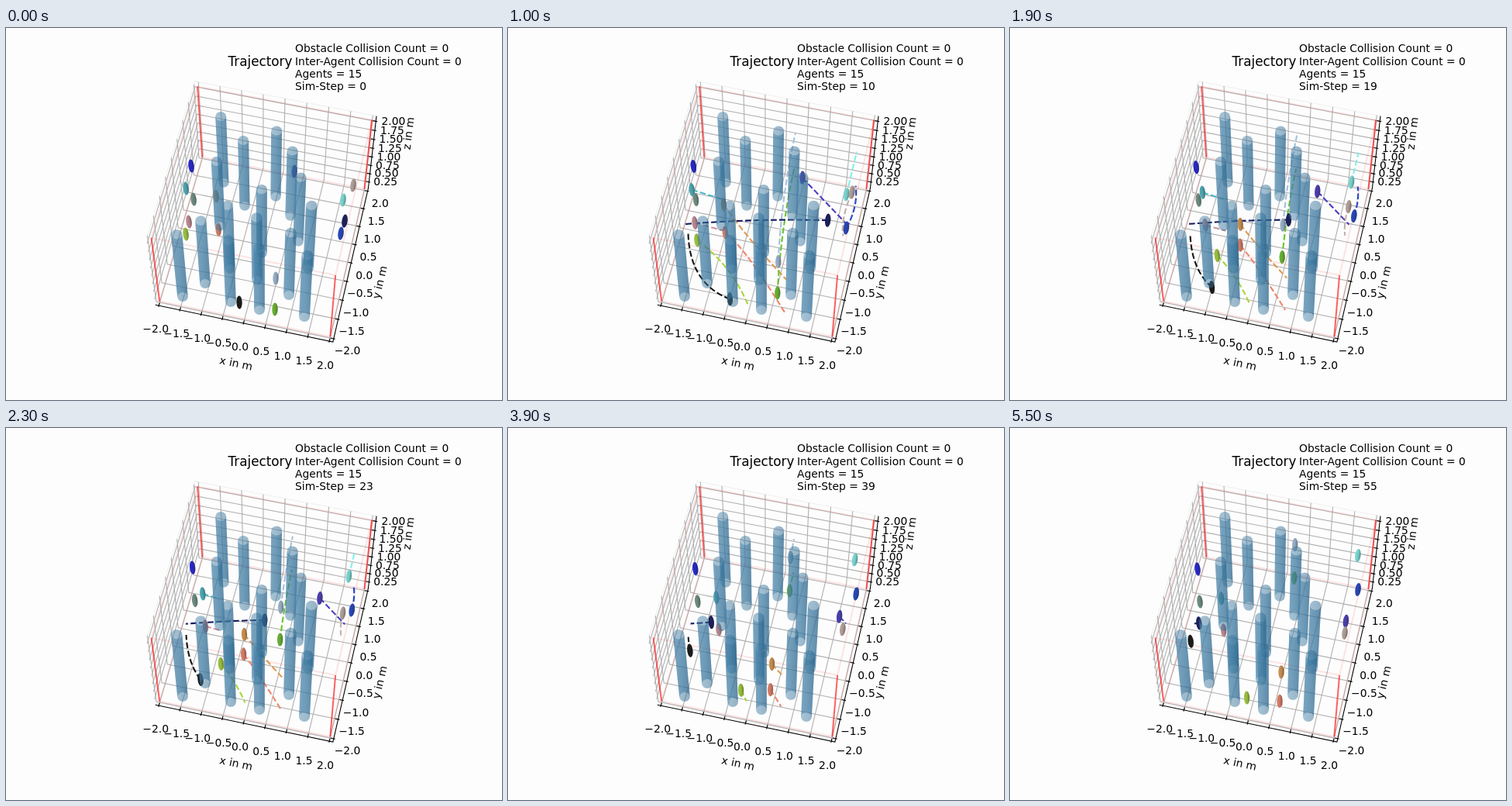
These frames come from a looping animation (640x480 px, 5.6 s). An HTML page:

```html
<!DOCTYPE html>
<html lang="en">
<head>
<meta charset="utf-8">
<title>Trajectory</title>
<style>
  html, body { margin: 0; width: 100%; height: 100%; overflow: hidden; background: #fdfdfd; }
  svg { display: block; width: 640px; height: 480px; }
  text { font: 13.89px "DejaVu Sans", sans-serif; fill: #000; white-space: pre; }
  .mid { text-anchor: middle; }
  .title { font-size: 16.8px; }
</style>
</head>
<body>
<svg id="stage" viewBox="0 0 640 480">
  <defs>
    <linearGradient id="wall">
      <stop offset="0" stop-color="#4d86ab"/>
      <stop offset=".5" stop-color="#3b789f"/>
      <stop offset="1" stop-color="#276188"/>
    </linearGradient>
    <linearGradient id="shade">
      <stop offset="0" stop-color="#555" stop-opacity=".15"/>
      <stop offset=".5" stop-color="#444" stop-opacity=".2"/>
      <stop offset="1" stop-color="#222" stop-opacity=".5"/>
    </linearGradient>
  </defs>
</svg>
<script>
const stage = document.getElementById('stage');

function add(parent, tag, attrs, text) {
  const el = document.createElementNS('http://www.w3.org/2000/svg', tag);
  for (const key in attrs) el.setAttribute(key, attrs[key]);
  if (text !== undefined) el.textContent = text;
  parent.appendChild(el);
  return el;
}
const group = () => add(stage, 'g', { fill: 'none' });
const label = (x, y, text, cls = '', turn = 0) =>
  add(stage, 'text', { x, y, class: cls, transform: `rotate(${turn} ${x} ${y - 5})` }, text);
const coords = pts => pts.map(p => p.map(v => v.toFixed(2)).join()).join(' ');

// Perspective camera: elevation 60°, azimuth -77°
const EL = Math.PI / 3, AZ = -77 * Math.PI / 180;
const se = Math.sin(EL), ce = Math.cos(EL), sa = Math.sin(AZ), ca = Math.cos(AZ);
function project([x, y, z]) {
  const k = 1997.8 / (10 - (ce * ca * x + ce * sa * y + se * z));
  return [333 + k * (ca * y - sa * x), 237.4 + k * (se * (ca * x + sa * y) - ce * z)];
}
const line = (parent, pts, stroke, width = 1.1) =>
  add(parent, 'polyline', { points: coords(pts.map(project)), stroke, 'stroke-width': width });

// Half extents of the data box, of the panes around it, and the label gap
const B = 0.5715, BZ = 0.4287, P = 0.5953, PZ = 0.4466, GAP = 0.117;

function tickLabel(at, dx, dy, value, digits) {
  const [x, y] = project(at);
  label(x + dx, y + dy + 5, value.toFixed(digits).replace('-', '\u2212'), 'mid');
}

function drawAxes() {
  const g = group(), grid = '#b0b0b0';
  line(g, [[-P, -P, PZ], [-P, P, PZ], [P, P, PZ]], '#efefef', 1);

  for (let v = -2; v <= 2; v += 0.5) {
    const s = B * v / 2;
    line(g, [[s, -P, -PZ], [s, P, -PZ], [s, P, PZ]], grid);
    line(g, [[P, s, -PZ], [-P, s, -PZ], [-P, s, PZ]], grid);
    line(g, [[s, -P - 0.01, -PZ], [s, -P + 0.02, -PZ]], '#000');
    line(g, [[P + 0.01, s, -PZ], [P - 0.02, s, -PZ]], '#000');
    tickLabel([s, -P - GAP, -PZ - GAP], 0.5, 0, v, 1);
    tickLabel([P + GAP, s, -PZ - GAP], -4, 0.5, v, 1);
  }
  // The height axis runs from 0.1 to 2.1
  for (let v = 0.25; v <= 2; v += 0.25) {
    const z = BZ * (v - 1.1);
    line(g, [[-P, -P, z], [-P, P, z], [P, P, z]], grid);
    line(g, [[P + 0.01, P, z], [P - 0.02, P, z]], '#000');
    tickLabel([P + GAP, P, z], -0.5, -5, v, 2);
  }
  line(g, [[-P, -P, -PZ], [P, -P, -PZ], [P, P, -PZ], [P, P, PZ]], '#000');

  const corners = [[-B, -B], [B, -B], [B, B], [-B, B]];
  corners.forEach(([x, y], i) => {
    const next = corners[(i + 1) % 4];
    for (const z of [-BZ, BZ]) line(g, [[x, y, z], [...next, z]], 'rgba(255,40,40,.12)', 2);
    line(g, [[x, y, -BZ], [x, y, BZ]], 'rgba(255,20,20,.68)', 2);
  });

  label(297, 437.5, 'x in m', 'mid', 12);
  label(482, 333, 'y in m', 'mid', -77);
  label(519, 141, 'z in m', 'mid', -83);
}

// Bottom centres of the pillars
const pillars = [
  [281, 200], [348, 218], [308, 230], [367, 243], [276, 256], [377, 276], [330, 291], [289, 311],
  [390, 311], [324, 326], [257, 330], [365, 345], [228, 347], [290, 354], [327, 364], [385, 373]
];
// Far and near half of the wall overlap; each end shows only one of them
function drawPillar(g, [x, y]) {
  const tx = x + (x - 333) * 0.075, ty = y - 86 + 0.035 * (y - 200);
  const r = 6.5 + (y - 200) * 0.002, R = r + 0.4;
  for (const sweep of [1, 0]) {
    add(g, 'path', {
      d: `M${tx - R} ${ty}A${R} ${R * 0.87} 0 0 ${sweep} ${tx + R} ${ty}` +
         `L${x + r} ${y}A${r} ${r * 0.87} 0 0 ${1 - sweep} ${x - r} ${y}Z`,
      fill: 'url(#wall)', 'fill-opacity': 0.49
    });
  }
}

// Colour, start, goal and, for curved flights, a control point
const agents = [
  ['#2020e0', [239, 178], [242, 182]],
  ['#4cb8c4', [232, 207], [273, 220]],
  ['#74988a', [242, 221], [245, 224]],
  ['#d0929c', [236, 250], [276, 261]],
  ['#a8d63c', [232, 266], [306, 349], [281, 296]],
  ['#e09a50', [271, 217], [351, 316], [299, 260]],
  ['#ee866a', [274, 260], [349, 354], [297, 271]],
  ['#4a3cc0', [372, 185], [434, 250]],
  ['#a4c0dc', [348, 323], [368, 149], [350, 237]],
  ['#101010', [301, 354], [233, 274], [239, 340]],
  ['#6cc22c', [347, 363], [367, 192], [349, 279]],
  ['#82efea', [435, 222], [449, 164]],
  ['#11165e', [437, 249], [242, 252], [340, 245]],
  ['#2046cc', [432, 265], [449, 208], [451, 237]],
  ['#c4aea6', [448, 203], [432, 265], [430, 240]]
];
const middle = (a, b) => a.map((v, i) => (v + b[i]) / 2);
const bezier = (a, c, b, u) =>
  a.map((v, i) => (1 - u) ** 2 * v + 2 * u * (1 - u) * c[i] + u * u * b[i]);

// All agents start gently and settle at the goal; the plan reaches a little past it
const progress = step => 1 - Math.exp(-((step / 26.3) ** 2.08));
const horizon = step => 1 + 0.1 * Math.exp(-step / 35);

drawAxes();
const trailLayer = group(), agentLayer = group(), pillarLayer = group();
pillars.forEach(p => drawPillar(pillarLayer, p));

const parts = agents.map(([color, from, to, via = middle(from, to)]) => {
  const trail = add(trailLayer, 'polyline', {
    stroke: color, 'stroke-width': 2.08, 'stroke-dasharray': '7.7 3.3'
  });
  const body = add(agentLayer, 'g', {});
  for (const fill of [color, 'url(#shade)']) add(body, 'ellipse', { rx: 3.6, ry: 8.6, fill });
  return { trail, body, at: u => bezier(from, via, to, u) };
});

label(328, 49.3, 'Trajectory', 'mid title');
label(373, 31.4, 'Obstacle Collision Count = 0');
label(373, 47.8, 'Inter-Agent Collision Count = 0');
label(373, 64.1, 'Agents = 15');
const counter = label(373, 80.4, '');

function draw(step) {
  const u = progress(step), end = horizon(step);
  counter.textContent = 'Sim-Step = ' + step;
  for (const { trail, body, at } of parts) {
    const [x, y] = at(u);
    body.setAttribute('transform', `translate(${x} ${y}) rotate(${(x - 333) * 0.07})`);
    const pts = [];
    for (let i = 0; i <= 24 && step > 0; i++) pts.push(at(u + (end - u) * i / 24));
    trail.setAttribute('points', coords(pts));
  }
}

let shown = -1;
function tick() {
  const step = Math.floor(performance.now() % 5600 / 100);
  if (step !== shown) draw(shown = step);
  requestAnimationFrame(tick);
}
tick();
</script>
</body>
</html>
```
